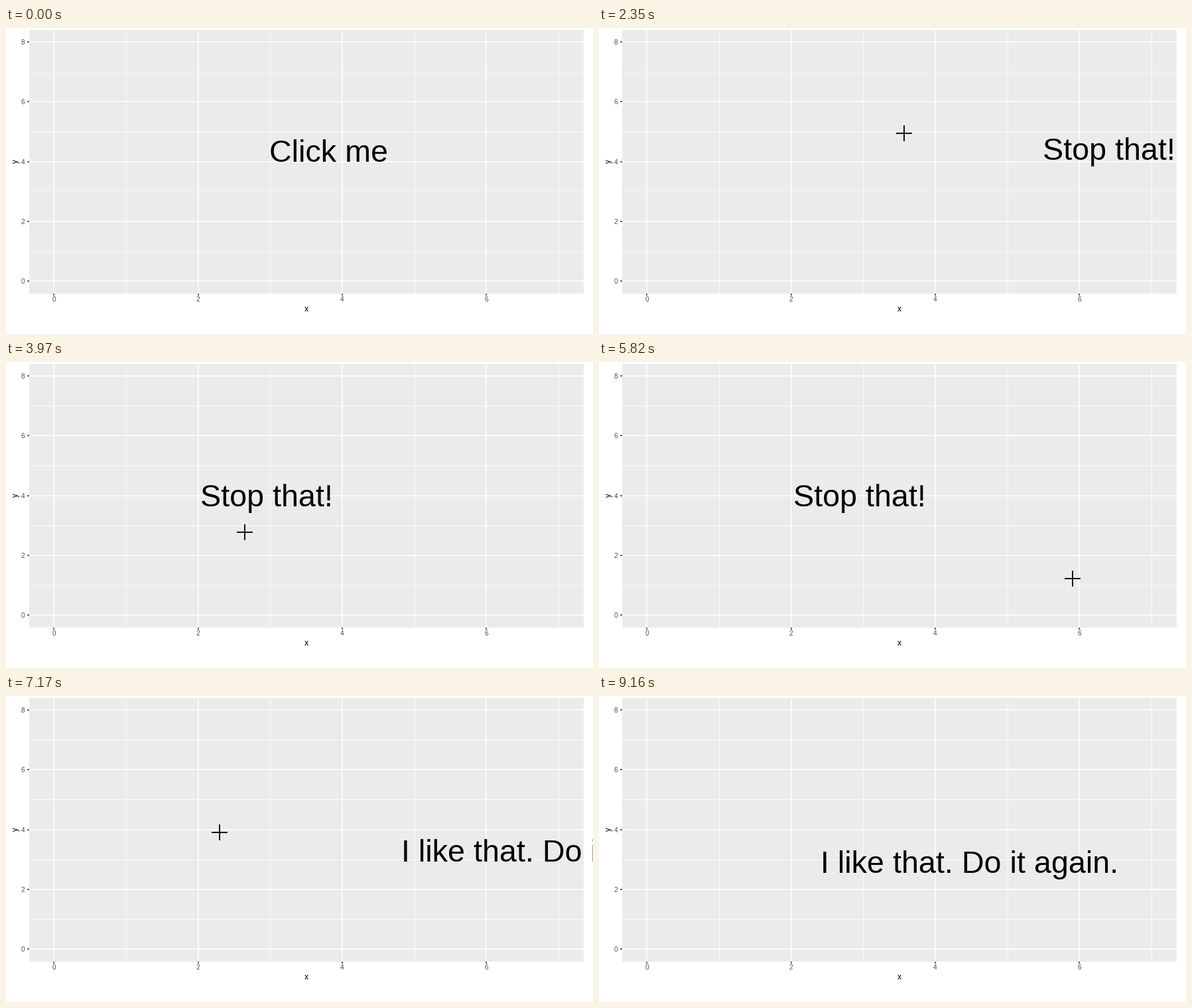
Recreate the animation shown at these times as a matplotlib script. Size 885 px wide and 462 px high, loop 9750 ms.

```python
import math

import matplotlib.pyplot as plt
from matplotlib.animation import FuncAnimation
from matplotlib.patches import Rectangle

W, H, DPI = 885, 462, 64
PT = 72 / DPI                      # points per pixel
LOOP, TICK = 9750, 25
LEFT, TOP, RIGHT, BOTTOM = 34.5, 3, 871, 401

LIKE = "I like that. Do it again."
STOP = "Stop that!"

# (time, message, x, y): each message starts where the pointer clicked
MESSAGES = [
    (0, "Click me", 398, 203),
    (1220, LIKE, 384, 310),
    (2020, STOP, 670, 200),
    (2830, LIKE, 408, 149),
    (3510, STOP, 294, 219),
    (6270, LIKE, 714, 327),
    (6920, LIKE, 597, 251),
    (7500, STOP, 322, 206),
    (8240, LIKE, 335, 268),
]

# (start, end, steps, destination, optional halfway point)
START = (712, 397)
MOVES = [
    (270, 760, 8, (384, 310), None),
    (1340, 1690, 6, (670, 200), (541, 261)),
    (2080, 2500, 7, (408, 149), None),
    (2890, 3170, 5, (294, 219), None),
    (3710, 3970, 5, (360, 257), None),
    (5100, 5350, 5, (734, 322), None),
    (5490, 5820, 5, (714, 327), None),
    (6340, 6490, 3, (597, 251), None),
    (6990, 7170, 4, (322, 206), None),
    (7570, 7980, 7, (335, 268), None),
    (8380, 8830, 8, (778, 420), None),
]

# The pointer blinks off while the button is down
PRESSES = [(960, 1080), (1810, 1880), (2620, 2690), (3310, 3380),
           (6060, 6130), (6710, 6780), (7240, 7360), (8040, 8100)]
ENTER, LEAVE = 200, 9160

plt.rcParams["font.family"] = "Liberation Sans"
fig = plt.figure(figsize=(W / DPI, H / DPI), dpi=DPI, facecolor="white")
ax = fig.add_axes([0, 0, 1, 1])
ax.set_xlim(0, W)
ax.set_ylim(H, 0)
ax.axis("off")


def px(v):
    return 72.4 + 108.65 * v


def py(v):
    return 382.3 - 45.18 * v


def label(x, y, s, size, color, **kw):
    return ax.text(x, y, s, fontsize=size * PT, color=color, **kw)


def draw_panel():
    ax.add_patch(Rectangle((LEFT, TOP), RIGHT - LEFT, BOTTOM - TOP,
                           fc="#ebebeb", lw=0, zorder=0))
    for start, width in ((1, 0.75), (0, 1.5)):
        ax.vlines([px(v) for v in range(start, 8, 2)], TOP, BOTTOM,
                  color="white", lw=width * PT, zorder=1)
        ax.hlines([py(v) for v in range(start, 9, 2)], LEFT, RIGHT,
                  color="white", lw=width * PT, zorder=1)
    for v in range(0, 7, 2):
        ax.vlines(px(v), BOTTOM, BOTTOM + 3, color="#333333", lw=1.5 * PT)
        label(px(v), 413, str(v), 10, "#4d4d4d", ha="center")
    for v in range(0, 9, 2):
        ax.hlines(py(v), LEFT - 3, LEFT, color="#333333", lw=1.5 * PT)
        label(28.5, py(v) + 4, str(v), 10, "#4d4d4d", ha="right")
    label(453, 427.5, "x", 12.5, "black", ha="center")
    label(15, 201.5, "y", 11.5, "black", ha="center", va="center", rotation=90)


draw_panel()
panel = Rectangle((LEFT, TOP), RIGHT - LEFT, BOTTOM - TOP,
                  transform=ax.transData)
message = label(0, 0, "", 46.6, "black", zorder=4)
message.set_clip_path(panel)
cross = [ax.plot([], [], color="#141414", lw=2 * PT, zorder=5,
                 antialiased=False, solid_capstyle="butt")[0]
         for _ in range(2)]


def ease(p):
    return p * p * (3 - 2 * p)


def pointer(t):
    pos = START
    for begin, end, steps, goal, via in MOVES:
        if t < begin:
            break
        gap = (end - begin) / (steps - 1)
        p = ease(min(1, (math.floor((t - begin) / gap + 1e-6) + 1) / steps))
        point = []
        for i in range(2):
            a, b = pos[i], goal[i]
            mid = via[i] if via else (a + b) / 2
            bend = 2 * mid - (a + b) / 2
            point.append(round((1 - p) ** 2 * a + 2 * p * (1 - p) * bend
                               + p * p * b))
        pos = tuple(point)
    return pos


def update(i):
    t = i * TICK + 20
    _, text, x, y = [m for m in MESSAGES if m[0] <= t][-1]
    message.set_text(text)
    message.set_position((x - 1, y - 1))

    cx, cy = pointer(t)
    shown = ENTER <= t < LEAVE and not any(a <= t < b for a, b in PRESSES)
    cross[0].set_data([cx - 12, cx + 12], [cy, cy])
    cross[1].set_data([cx, cx], [cy - 12, cy + 12])
    for line in cross:
        line.set_visible(shown)
    return [message, *cross]


anim = FuncAnimation(fig, update, frames=LOOP // TICK, interval=TICK,
                     repeat=True, repeat_delay=0)
plt.show()
```
